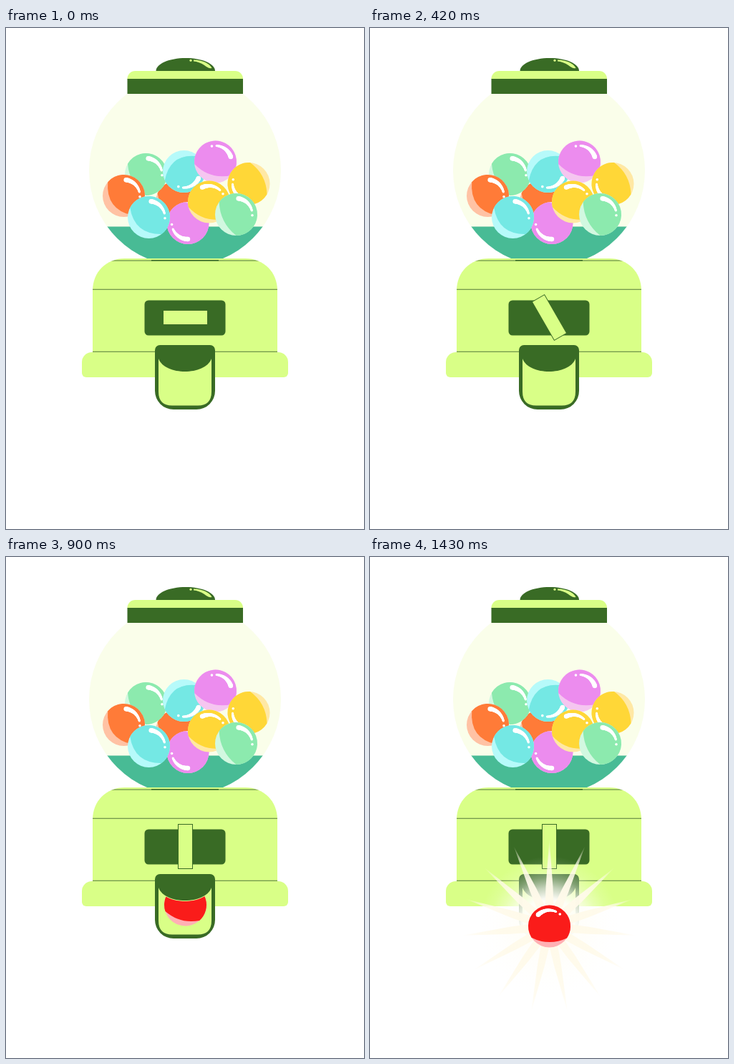
These frames come from a looping animation (500x700 px, 8 s). An HTML page with a canvas:

```html
<!DOCTYPE html>
<html lang="en">
<head>
<meta charset="utf-8">
<title>Gumball machine</title>
<style>
html, body { margin: 0; width: 100%; height: 100%; overflow: hidden; background: #fff; }
canvas { display: block; }
</style>
</head>
<body>
<canvas id="stage" width="500" height="700"></canvas>
<script>
const ctx = document.getElementById('stage').getContext('2d');
const LOOP = 8000, RADIUS = 29.5, RAD = Math.PI / 180, TAU = Math.PI * 2;
const DARK = '#396b25', LIME = '#d9ff87', TEAL = '#48bb95';
const CX = 250.5, REST_Y = 516;

// [body, shade]
const COLORS = {
  green: ['#8ceaae', '#d2f8e0'],
  orange: ['#ff7b38', '#ffc2a4'],
  cyan: ['#74e8e4', '#b6fafa'],
  pink: ['#ec8cee', '#f5c6f0'],
  yellow: ['#ffd737', '#ffe8a4'],
  red: ['#fa1c1a', '#ffb0b4']
};

// shade: direction and half-width of the pale crescent; shine: start angle and turn
const BALLS = [
  { x: 238.5, y: 243, color: 'orange', shade: [144, 60] },
  { x: 195.5, y: 204.5, color: 'green', shade: [150, 60], shine: [-82, 1] },
  { x: 248.5, y: 200.5, color: 'cyan', shade: [235, 80], shine: [25, 1] },
  { x: 292.5, y: 187, color: 'pink', shade: [107, 67], shine: [-18, -1] },
  { x: 339, y: 217.5, color: 'yellow', shade: [-28, 58], shine: [-250, 1] },
  { x: 164.5, y: 234.5, color: 'orange', shade: [144, 77], shine: [-82, 1] },
  { x: 254, y: 272.5, color: 'pink', shade: [-50, 50], shine: [90, 1] },
  { x: 283.5, y: 243, color: 'yellow', shade: [111, 55], shine: [-115, 1] },
  { x: 199.5, y: 264.5, color: 'cyan', shade: [130, 77], shine: [-82, 1] },
  { x: 321.5, y: 260.5, color: 'green', shade: [153, 63], shine: [-82, 1] }
];

// The motion is stepped: each pose holds until the next
const POSES = [
  { t: 0, turn: 0, lift: 0, glow: 0 },
  { t: 100, turn: 15, lift: -4 },
  { t: 300, turn: 30, lift: 0 },
  { t: 360, turn: 45 },
  { t: 400, turn: 60 },
  { t: 440, turn: 75 },
  { t: 480, turn: 90 },
  { t: 520, lift: 5 },
  { t: 550, lift: 10 },
  { t: 580, lift: 5 },
  { t: 610, lift: 0 },
  { t: 640, lift: 5 },
  { t: 670, lift: 10 },
  { t: 700, lift: 5 },
  { t: 800, lift: 0, drop: 45 },
  { t: 900, drop: 30 },
  { t: 1000, drop: 15 },
  { t: 1100, drop: 0 },
  { t: 1200, glow: 0.2 },
  { t: 1230, glow: 0.42 },
  { t: 1330, glow: 0.72 },
  { t: 1430, glow: 1 }
];

const poseAt = time => Object.assign({}, ...POSES.filter(p => p.t <= time));

function fill(color, path) {
  ctx.fillStyle = color;
  ctx.fill(path);
}

function roundRect(color, x, y, w, h, radii) {
  const path = new Path2D();
  path.roundRect(x, y, w, h, radii);
  fill(color, path);
}

function dot(x, y, r) {
  ctx.beginPath();
  ctx.arc(x, y, r, 0, TAU);
  ctx.fill();
}

function drawShine(start, turn) {
  ctx.fillStyle = '#fff';
  const spot = (sweep, r) => {
    const a = (start + turn * sweep) * RAD;
    dot(22.5 * Math.cos(a), 22.5 * Math.sin(a), r);
  };
  for (let sweep = 0; sweep <= 68; sweep += 2) spot(sweep, 3.2 - 1.7 * sweep / 68);
  spot(85, 1.8);
}

function drawBall({ x, y, color, shade: [dir, half], shine }, rotation = 0) {
  const [body, pale] = COLORS[color];
  ctx.save();
  ctx.translate(x, y);
  ctx.rotate(rotation * RAD);
  ctx.fillStyle = pale;
  dot(0, 0, RADIUS);
  ctx.save();
  ctx.rotate(dir * RAD);
  const chord = RADIUS * Math.cos(half * RAD);
  const depth = 2 * Math.max(19, chord + 6) - chord;
  ctx.fillStyle = body;
  ctx.beginPath();
  ctx.arc(0, 0, RADIUS, half * RAD, TAU - half * RAD);
  ctx.quadraticCurveTo(depth, 0, chord, RADIUS * Math.sin(half * RAD));
  ctx.fill();
  ctx.restore();
  if (shine) drawShine(...shine);
  ctx.restore();
}

function drawLid() {
  fill(DARK, new Path2D('M209.5 60C209.5 50 228 42 251 42S292 50 292 60Z'));
  fill(LIME, new Path2D('M262 44.5C274 45 284 49 287.5 56C284 57 281 55 277 52C272 48.500 267 47 262 46.500Z'));
  dot(258, 45.3, 1.6);
  roundRect(LIME, 169.5, 60, 161.5, 12, [11, 11, 0, 0]);
  ctx.fillStyle = DARK;
  ctx.fillRect(169.5, 71, 161.5, 21);
}

function drawGlobe() {
  ctx.save();
  ctx.beginPath();
  ctx.rect(100, 92, 300, 231);
  ctx.clip();
  ctx.fillStyle = '#fafeea';
  dot(250, 199, 134);
  ctx.beginPath();
  ctx.rect(100, 277.5, 300, 50);
  ctx.clip();
  ctx.fillStyle = TEAL;
  dot(250, 199, 134);
  ctx.restore();
}

function drawBase() {
  const body = new Path2D('M121 453V367C121 341 140 322 166 322H334C360 322 379 341 379 367V453Z');
  fill(LIME, body);
  ctx.save();
  ctx.clip(body);
  ctx.fillStyle = '#6b8f48';
  for (const y of [324.4, 364.7, 451.7]) ctx.fillRect(100, y, 300, 1.2);
  ctx.fillStyle = DARK;
  ctx.fillRect(203, 324, 94, 1.4);
  ctx.restore();
  roundRect(LIME, 106, 453, 288, 35, [14, 14, 6, 6]);
  roundRect(DARK, 193.5, 380.5, 113, 49, 5.5);
}

function drawHandle(turn) {
  ctx.save();
  ctx.translate(CX, 404.5);
  ctx.rotate(turn * RAD);
  ctx.fillStyle = LIME;
  ctx.strokeStyle = DARK;
  ctx.lineWidth = 1;
  ctx.fillRect(-31, -10, 62, 20);
  ctx.strokeRect(-31, -10, 62, 20);
  ctx.restore();
}

function drawChute() {
  roundRect(DARK, 208, 443, 84, 90, [7, 7, 26, 26]);
  fill(LIME, new Path2D('M213 462C222 486 278 486 287 462V508Q287 527.500 268 527.500H232Q213 527.500 213 508Z'));
}

function drawGlow(strength) {
  if (!strength) return;
  const radial = (r, stops) => {
    const g = ctx.createRadialGradient(0, 0, 0, 0, 0, r);
    for (const [at, rgb, alpha] of stops) g.addColorStop(at, `rgba(${rgb},${alpha})`);
    return g;
  };
  const cream = '255,250,234', white = '255,254,249';
  ctx.save();
  ctx.translate(CX, REST_Y);
  ctx.globalAlpha = strength;
  ctx.fillStyle = radial(98, [
    [0, white, 1], [0.4, white, 0.97], [0.55, white, 0.7],
    [0.7, white, 0.36], [0.85, white, 0.12], [1, white, 0]
  ]);
  dot(0, 0, 98);
  ctx.fillStyle = radial(122, [
    [0, cream, 1], [0.55, cream, 0.95], [0.8, cream, 0.7], [1, cream, 0.1]
  ]);
  for (let i = 0; i < 15; i++) {
    ctx.save();
    ctx.rotate((i * 24 - 90) * RAD);
    ctx.beginPath();
    ctx.moveTo(20, -6);
    ctx.lineTo(55, -5);
    ctx.lineTo(122, 0);
    ctx.lineTo(55, 5);
    ctx.lineTo(20, 6);
    ctx.fill();
    ctx.restore();
  }
  ctx.restore();
}

function drawPrize(drop) {
  if (drop === undefined) return;
  ctx.save();
  if (drop) ctx.clip(new Path2D('M213 463C222 487 278 487 287 463V560H213Z'));
  drawBall({ x: CX, y: REST_Y - drop, color: 'red', shade: [91, 57], shine: [-134, 1] }, drop * 0.47);
  ctx.restore();
}

function draw(time) {
  const pose = poseAt(time);
  ctx.fillStyle = '#fff';
  ctx.fillRect(0, 0, 500, 700);
  drawGlobe();
  drawLid();
  for (const ball of BALLS) drawBall({ ...ball, y: ball.y - pose.lift });
  drawBase();
  drawHandle(pose.turn);
  drawChute();
  drawGlow(pose.glow);
  drawPrize(pose.drop);
}

let start;
function tick(now) {
  start ??= now;
  draw((now - start) % LOOP);
  requestAnimationFrame(tick);
}
draw(0);
requestAnimationFrame(tick);
</script>
</body>
</html>
```
